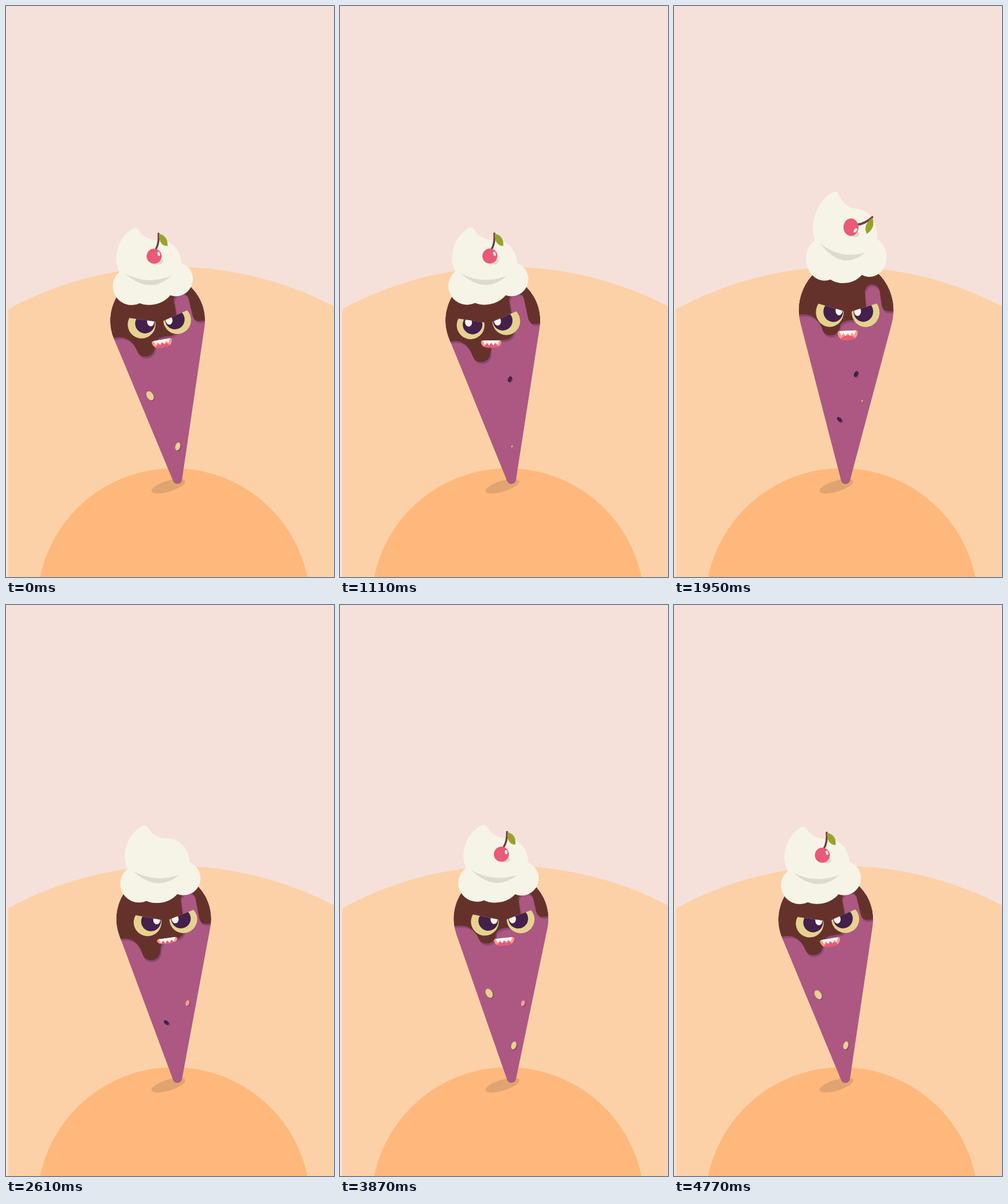
These frames come from a looping animation (567x987 px, 4800 ms). An HTML page:

```html
<!DOCTYPE html>
<html lang="en">
<head>
<meta charset="utf-8">
<title>Grumpy ice cream</title>
<style>
  html, body { margin: 0; width: 100%; height: 100%; overflow: hidden; background: #f5e1da; }
  svg { display: block; width: 100%; height: 100%; }
</style>
</head>
<body>
<svg viewBox="0 0 567 987" preserveAspectRatio="none">
  <defs>
    <clipPath id="hill"><rect x="4" width="563" height="987"/></clipPath>
    <clipPath id="coneClip"><use href="#coneShape"/></clipPath>
    <path id="coneShape" d="M-78.7-256.2A81.7 81.7 0 1 1 78.7-256.2L7.7 .1A8 8 0 0 1-7.7 .1Z"/>
    <clipPath id="lidL"><path d="M-30-16.7L30-.4V30H-30Z"/></clipPath>
    <clipPath id="lidR"><path d="M30-18L-30 .4V30H30Z"/></clipPath>
    <clipPath id="lips"><path id="lipShape"/></clipPath>
  </defs>

  <rect width="567" height="987" fill="#f5e1da"/>
  <circle cx="290" cy="1048" r="597" fill="#fcd1a8" clip-path="url(#hill)"/>
  <circle cx="290" cy="1035" r="236" fill="#ffb87c"/>
  <ellipse rx="30.5" ry="9.5" transform="translate(280.7 830) rotate(-17)" fill="#e0a471"/>

  <g id="body">
    <use href="#coneShape" fill="#ac5882"/>
    <g clip-path="url(#coneClip)">
      <path id="sauceShade" fill="#8c4972" transform="translate(1.5 3.5)"/>
      <path id="sauce" fill="#65322b"/>
    </g>
    <g id="sprinkles"></g>

    <g id="face">
      <g transform="translate(-28.3 -275)" clip-path="url(#lidL)">
        <circle r="24" fill="#e6d28f"/>
        <circle id="pupilL" cy="-1" r="17" fill="#44204a"/>
        <ellipse id="glintL" rx="6" ry="7.5" fill="#f8f6f0"/>
      </g>
      <g transform="translate(33.7 -275)" clip-path="url(#lidR)">
        <circle r="24" fill="#e6d28f"/>
        <circle id="pupilR" cy="-1.5" r="17" fill="#44204a"/>
        <ellipse id="glintR" cy="-1.5" rx="6" ry="7.5" fill="#f8f6f0"/>
      </g>
      <g id="mouth" clip-path="url(#lips)">
        <rect x="-20" y="-2" width="40" height="24" fill="#fb9a8b"/>
        <ellipse id="tongue" rx="12.5" ry="8" fill="#e85a78"/>
        <path d="M-15-1H15L11 8 7.5 3.5 3.7 9 0 4-3.7 9-7.5 3.5-11 8Z" fill="#fdfbf2"/>
      </g>
    </g>

    <g id="cream">
      <path fill="#f6f4e6" d="M-21-442C-40-437-58-412-58-388C-58-382-57-376-54.5-370A32.3 32.3 0 0 0-27-312C-14-304 12-304 27-319A29.5 29.5 0 0 0 53-372C55-397 38-416 16-417C2-418-9-428-13-437C-15-441-17-443-21-442Z"/>
      <path fill="#dcdbcd" d="M-46-366Q-7.5-323 33-352Q-11-341-46-366Z"/>
      <g transform="translate(7.8 -389.5)">
        <ellipse id="cherryShade" cx="7" cy="10" rx="7.5" ry="5" fill="#dcdbcd"/>
        <g id="cherry">
          <path d="M4-11Q11.6-20.7 12.3-37.8" fill="none" stroke="#6f3f42" stroke-width="3.4" stroke-linecap="round"/>
          <circle r="13" fill="#e85a78"/>
          <ellipse rx="2.2" ry="3.7" transform="translate(8.4 -3) rotate(-8)" fill="#fbf1ee"/>
          <path d="M12.6-37C20-36 28-29 25-15C16-15 11-24 12.6-37Z" fill="#9ba52b"/>
          <path d="M13-36Q20-27 25-15" fill="none" stroke="#8a9428" stroke-width=".8"/>
        </g>
      </g>
    </g>
  </g>
</svg>
<script>
const LOOP = 4800, STEP = 30, SWAY = 1200, RAMP = 400;
const el = id => document.getElementById(id);
const put = (id, attrs) => {
  for (const k in attrs) el(id).setAttribute(k, attrs[k]);
};
const smooth = x => {
  x = Math.min(1, Math.max(0, x));
  return x * x * (3 - 2 * x);
};

// Cyclic monotone curve through [time, value] keys, the first at time 0.
function track(keys, period) {
  const n = keys.length;
  const key = i => {
    const wrap = Math.floor(i / n), k = keys[i - wrap * n];
    return [k[0] + wrap * period, k[1]];
  };
  const slope = i => {
    const [a, b, c] = [key(i - 1), key(i), key(i + 1)];
    return (b[1] - a[1]) * (c[1] - b[1]) > 0 ? (c[1] - a[1]) / (c[0] - a[0]) : 0;
  };
  return time => {
    const t = time % period;
    let i = n - 1;
    while (keys[i][0] > t) i--;
    const a = key(i), b = key(i + 1), w = b[0] - a[0], u = (t - a[0]) / w;
    return a[1] + (b[1] - a[1]) * smooth(u)
      + w * u * (1 - u) * (slope(i) * (1 - u) - slope(i + 1) * u);
  };
}

const melt = track([[0, .6], [210, .93], [690, 1], [1110, .93], [1470, 0], [1950, 0], [2370, .57]], 2400);
const jaw = track([[0, 14], [1110, 12.5], [1950, 15.5], [2610, 9.5], [3090, 13.5], [3870, 13], [4770, 14]], LOOP);
const look = track([[0, 0], [650, 0], [950, 1], [1250, 1], [1550, 0]], LOOP);

const sprinkles = [
  { x: -29, y: -151, rx: 5.5, ry: 8.5, tilt: -25, fill: '#e6d28f', from: 3350, to: 5150 },
  { x: 7.7, y: -58.3, rx: 4.2, ry: 7, tilt: 22, fill: '#e6d28f', from: 2650, to: 5650 },
  { x: 17.5, y: -174, rx: 3.4, ry: 5.2, tilt: 30, fill: '#44204a', from: 600, to: 2150 },
  { x: 28.3, y: -130, rx: 3.2, ry: 5.2, tilt: 20, fill: '#fb9a8b', from: 1770, to: 4200 },
  { x: -10.8, y: -99.6, rx: 3.1, ry: 5.2, tilt: -48, fill: '#44204a', from: 1350, to: 3300 }
];
el('sprinkles').innerHTML = sprinkles.map((s, i) => {
  const oval = (dx, dy, fill) =>
    `<ellipse rx="${s.rx}" ry="${s.ry}" transform="translate(${dx} ${dy}) rotate(${s.tilt})" fill="${fill}"/>`;
  return `<g id="sprinkle${i}">${oval(1.5, 1.8, '#8c4972')}${oval(0, 0, s.fill)}</g>`;
}).join('');

function saucePath(d) {
  const left = -271 + 22 * d, drip = -237 + 30 * d, mid = -262 + 21 * d;
  const right = -277 + 14.5 * d, notch = -323;
  return `M-95-380V${left}H-74C-56 ${left - 1} -46 ${left + 12} -42 ${drip - 13}`
    + `C-40 ${drip - 4} -35 ${drip} -26 ${drip}C-17 ${drip} -11 ${drip - 7} -10 ${drip - 17}`
    + `C-9 ${mid + 4} 0 ${mid} 8 ${mid}H18C28 ${mid} 34.5 ${mid - 8} 34.5 ${mid - 18}`
    + `L32 ${notch + 14}A13 13 0 0 1 57.5 ${notch + 12}L61 ${right - 12}`
    + `C62 ${right - 4} 66 ${right} 73 ${right}H95V-380Z`;
}

function lipPath(h) {
  return `M-14 0H14Q18 0 17.5 4C15 ${h} 8 ${h} 0 ${h}C-8 ${h} -15 ${h} -17.5 4Q-18 0-14 0Z`;
}

function draw(t) {
  const hop = t > 1650 && t < 2150 ? 1.1 * Math.sin(Math.PI * (t - 1650) / 500) ** 2 : 0;
  const lean = -3.1 - 4 * Math.cos(2 * Math.PI * t / SWAY) + .5 * hop;
  put('body', { transform: `translate(296.5 820) scale(1 ${1 + .057 * hop}) rotate(${lean})` });
  put('cream', { transform: `translate(0 ${-306 - 16 * hop}) scale(1 ${1 + .105 * hop}) translate(0 306)` });

  const sauce = saucePath(melt(t));
  put('sauce', { d: sauce });
  put('sauceShade', { d: sauce });

  const q = look(t), h = jaw(t);
  put('face', { transform: `translate(${-10.8 * q} ${.5 * q})` });
  put('pupilL', { cx: 6 - 2.5 * q });
  put('pupilR', { cx: -4 - 2 * q });
  put('glintL', { cx: 16 - 19 * q, cy: -2.5 - 3 * q });
  put('glintR', { cx: -14 - q });
  put('mouth', { transform: `translate(${2.7 + 1.2 * q} -245) rotate(${-2.5 + 8.5 * q})` });
  put('lipShape', { d: lipPath(h) });
  put('tongue', { cy: h });

  // The cherry tips over and sinks, then pops back upright.
  const gone = t < 3000;
  const spin = gone ? 100 * smooth((t - 1700) / 500) : 0;
  const size = gone ? 1 - smooth((t - 1960) / 380) : smooth((t - 3095) / 400);
  const shade = gone ? size : smooth((t - 3050) / 400);
  put('cherry', { transform: `rotate(${spin}) scale(${size})` });
  put('cherryShade', { transform: `translate(2 11) scale(${shade}) translate(-2 -11)` });

  sprinkles.forEach((s, i) => {
    const age = t < s.from ? t + LOOP : t;
    const k = smooth((age - s.from) / RAMP) * (1 - smooth((age - s.to) / RAMP));
    put('sprinkle' + i, { transform: `translate(${s.x} ${s.y}) scale(${k})` });
  });
}

let start;
function tick(now) {
  start ??= now;
  draw(Math.floor((now - start) % LOOP / STEP) * STEP);
  requestAnimationFrame(tick);
}
draw(0);
requestAnimationFrame(tick);
</script>
</body>
</html>
```
